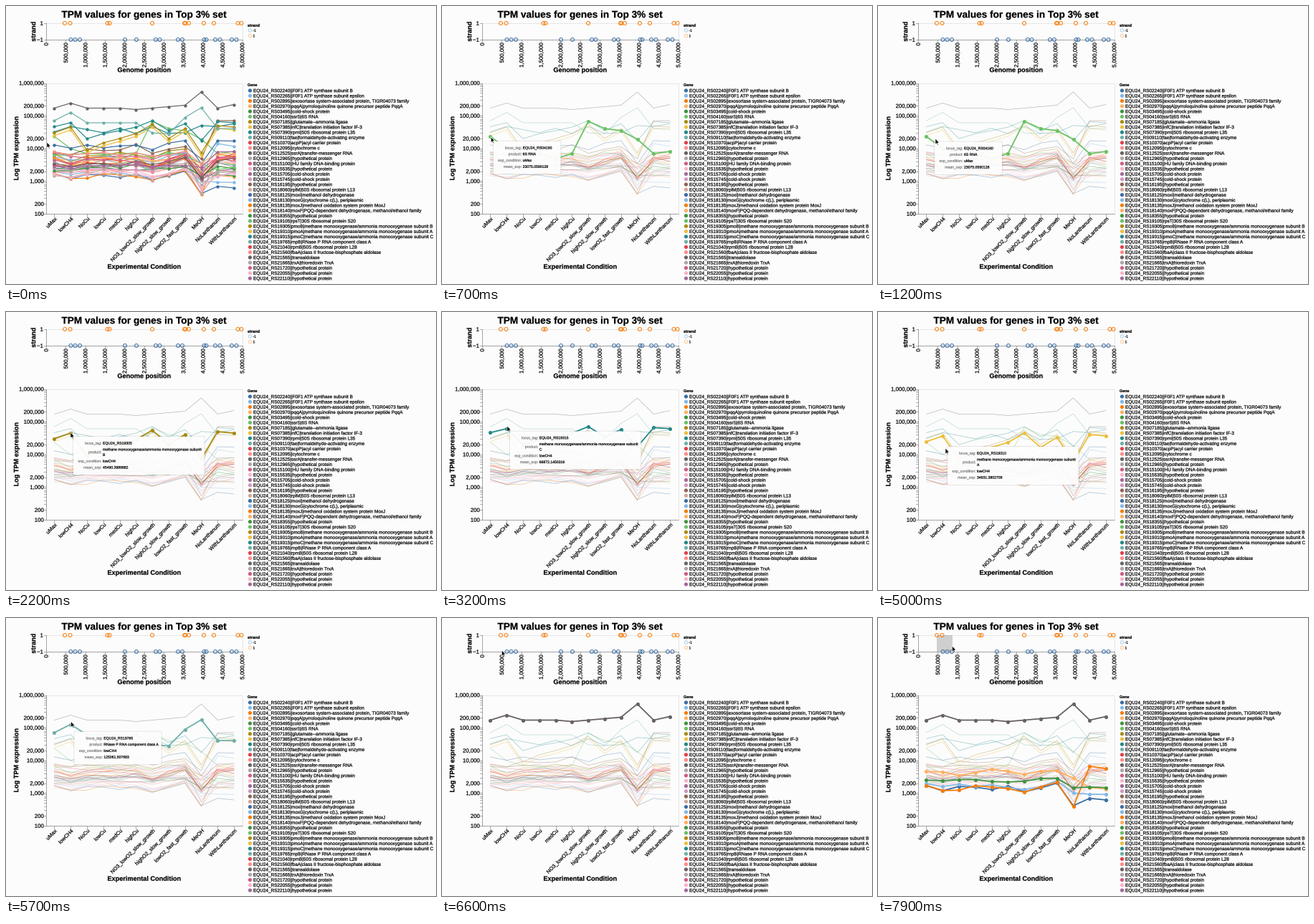
Animation, 600 px wide and 388 px high, one loop 8 s. Source, as a matplotlib script:

```python
import matplotlib.pyplot as plt
import numpy as np
from matplotlib.animation import FuncAnimation
from matplotlib.patches import Circle, FancyBboxPatch, PathPatch, Polygon, Rectangle
from matplotlib.textpath import TextPath
from matplotlib.transforms import Affine2D

W, H, DPI = 600, 388, 100
FRAMES, STEP = 80, 100
PX = 72 / DPI
X0, X1 = 56, 329.5
TOP, BOTTOM = 107.5, 290
BG, AXIS = "#fcfcfc", "#888888"

fig = plt.figure(figsize=(W / DPI, H / DPI), dpi=DPI, facecolor=BG)
ax = fig.add_axes([0, 0, 1, 1])
ax.set(xlim=(0, W), ylim=(H, 0))
ax.axis("off")

PALETTE = ["#3a6ea5", "#83b9e6", "#f77c08", "#ffb061", "#3f9440",
           "#6cc264", "#ab8a0f", "#edbf3c", "#238a87", "#6fb0aa",
           "#e0424a", "#ff8b88", "#686362", "#b0a6a2", "#cf5b88",
           "#fab2c9", "#a5689a", "#cf97c0", "#8e654f", "#d0a896"]

MMO = "methane monooxygenase/ammonia monooxygenase subunit"
GENES = f"""02240||F0F1 ATP synthase subunit B
02265||F0F1 ATP synthase subunit epsilon
02895||exosortase system-associated protein, TIGR04073 family
02970|pqqA|pyrroloquinoline quinone precursor peptide PqqA
03495||cold-shock protein
04160|ssrS|6S RNA
07185||glutamate--ammonia ligase
07385|infC|translation initiation factor IF-3
07390|rpmI|50S ribosomal protein L35
09110|fae|formaldehyde-activating enzyme
10370|acpP|acyl carrier protein
12095||cytochrome c
12525|ssrA|transfer-messenger RNA
12965||hypothetical protein
15100||HU family DNA-binding protein
15535||hypothetical protein
15705||cold-shock protein
15745||cold-shock protein
16195||hypothetical protein
18060|rplM|50S ribosomal protein L13
18125|moxI|methanol dehydrogenase
18130|moxG|cytochrome c(L), periplasmic
18135|moxJ|methanol oxidation system protein MoxJ
18140|moxF|PQQ-dependent dehydrogenase, methanol/ethanol family
18355||hypothetical protein
19105|rpsT|30S ribosomal protein S20
19305|pmoB|{MMO} B
19310|pmoA|{MMO} A
19315|pmoC|{MMO} C
19765|rnpB|RNase P RNA component class A
21040|rpmB|50S ribosomal protein L28
21560|fbaA|class II fructose-bisphosphate aldolase
21565||transaldolase
21665|trxA|thioredoxin TrxA
21720||hypothetical protein
22055||hypothetical protein
22110||hypothetical protein""".split("\n")
PRODUCT = {g[:5]: g.split("|")[2] for g in GENES}

CONDITIONS = ["uMax", "lowCH4", "NoCu", "lowCu", "medCu", "highCu",
              "NO3_lowO2_slow_growth", "highO2_slow_growth",
              "lowO2_fast_growth", "MeOH", "NoLanthanum", "WithLanthanum"]
COND_X = X0 + (X1 - X0) / 12 * (np.arange(12) + 0.5)

FORWARD = (82, 89.5, 141.5, 144.5, 204, 249, 250.5, 255, 276, 290, 323.5, 328.5)
REVERSE = (90.5, 96.5, 103, 166, 182, 209, 214.5, 240, 246, 276.5, 279.5,
           292, 298.5, 315, 321.5)
LOCUS = dict(zip(PRODUCT, sorted(FORWARD + REVERSE)))


def bumps(**steps):
    """Offsets by condition, given as c<index>=pixels."""
    y = np.zeros(12)
    for key, dy in steps.items():
        y[int(key[1:])] = dy
    return y


def make_series():
    rng = np.random.default_rng(7)
    trend = bumps(c1=4, c2=1, c6=5, c8=-4, c9=16)
    lanthanum = bumps(c10=1, c11=1)
    # base height, strength of the trend, lanthanum shift
    traits = {"02240": (236, 1.6, 18), "02265": (236, 0.6, 10),
              "02895": (236, 1.7, -26), "02970": (214, 0.6, 21),
              "03495": (226, 1.0, 11), "07390": (176, -0.7, -8),
              "16195": (200, 1.0, -40), "18125": (194, 1.5, -5)}
    out = {}
    for gene in PRODUCT:
        drawn = rng.uniform(206, 242), rng.uniform(0, 2), rng.normal(-2, 9)
        base, swing, shift = traits.get(gene, drawn)
        y = base + swing * trend + shift * lanthanum + rng.normal(0, 2.5, 12)
        out[gene] = np.clip(y, 160, 266)
    copper = bumps(c0=-8, c1=-16, c2=16, c3=6, c5=-7, c6=-20, c8=-14, c9=20, c10=-18, c11=-16)
    out["19305"] = 185 + copper
    out["19310"] = 189 + copper
    out["19315"] = 174 + 0.7 * copper
    out["04160"] = 206 + bumps(c0=-24, c1=-7, c4=7, c6=-45, c7=-35, c8=-32, c9=-20, c11=-3)
    out["12525"] = 142.5 + bumps(c1=-7, c5=2, c7=-2, c8=-4, c9=-22.5, c11=-5)
    out["19765"] = 163 + bumps(c0=-3, c1=-14.5, c6=14, c7=15.5, c8=-7.5, c9=-21, c10=8, c11=8)
    return out


def text(x, y, s, size, ha="left", weight="normal", angle=0, color="black",
         move=None, **kw):
    """Text as outlines, centred on y, with a hairline for a fuller stroke."""
    path = TextPath((0, 0), s, size=size, prop={"family": "Liberation Sans", "weight": weight})
    dx = {"left": 0, "center": 0.5, "right": 1}[ha] * path.get_extents().x1
    place = Affine2D().translate(-dx, -0.35 * size).scale(1, -1)
    place.rotate_deg(-angle).translate(x, y)
    to_screen = ax.transData if move is None else move + ax.transData
    return ax.add_patch(PathPatch(path, fc=color, ec=color, lw=0.22 * PX,
                                  transform=place + to_screen, **kw))


def line(xs, ys, color=AXIS, width=0.7, **kw):
    return ax.plot(xs, ys, color=color, lw=width * PX, **kw)[0]


def ring(x, y, r, color, width):
    ax.add_patch(Circle((x, y), r, fill=False, ec=color, lw=width * PX, alpha=0.9, zorder=3))


def view(y0, y1):
    ax.add_patch(Rectangle((X0, y0), X1 - X0, y1 - y0, fill=False, ec="#dddddd", lw=0.7 * PX))
    line([X0, X0], [y0, y1])
    line([X0, X1], [y1, y1])


def genome_chart():
    text(192.5, 11.5, "TPM values for genes in Top 3% set", 13.6, "center", "bold")
    view(24, 47)
    for y, s in ((24, "1"), (47, "−1")):
        line([52.5, X0], [y, y])
        text(51.5, y, s, 7.8, "right")
    for i in range(11):
        x = X0 + (X1 - X0) * i / 10
        line([x, x], [47, 50])
        text(x, 51.5, f"{i * 500000:,}", 7.8, "right", angle=90)
    text(38, 36, "strand", 9.15, "center", "bold", 90)
    text(192.5, 89, "Genome position", 9.15, "center", "bold")
    for x in FORWARD:
        ring(x, 24, 2.5, PALETTE[2], 1.1)
    for x in REVERSE:
        ring(x, 47, 2.5, PALETTE[0], 1.1)
    text(337, 27, "strand", 5.6, weight="bold")
    for y, s, c in ((34, "-1", PALETTE[1]), (41.5, "1", PALETTE[3])):
        ring(340.5, y, 2.2, c, 0.7)
        text(344.5, y, s, 5)


def expression_frame():
    view(TOP, BOTTOM)
    for e in range(2, 7):
        for m in range(1, 10 if e < 6 else 2):
            y = TOP + (6 - e - np.log10(m)) * (BOTTOM - TOP) / 4
            line([52.5, X0], [y, y])
            if m < 3:
                text(52.5, y, f"{m * 10 ** e:,}", 7.8, "right")
    for x, s in zip(COND_X, CONDITIONS):
        line([x, x], [BOTTOM, BOTTOM + 3.5])
        text(x + 2, 296, s, 7.3, "right", angle=45)
    text(14, 199, "Log TPM expression", 9.15, "center", "bold", 90)
    text(192.5, 363.5, "Experimental Condition", 9.15, "center", "bold")


def gene_legend():
    text(337, 110, "Gene", 5.4, weight="bold")
    for i, g in enumerate(GENES):
        y = 118 + i * 7.28
        ax.add_patch(Circle((340.5, y), 2.6, fc=PALETTE[i % 20], ec="none"))
        text(345, y, "EQU24_RS" + g, 6.41)


def tooltip(gene, cond, value):
    """Build a tooltip at the origin; `drift` carries it to the pointer."""
    wide = PRODUCT[gene].startswith(MMO)
    extra = 7.5 if wide else 0
    product = [MMO, PRODUCT[gene][-1]] if wide else [PRODUCT[gene]]
    rows = [("locus_tag:", 9, ["EQU24_RS" + gene]),
            ("product:", 17.7 + extra / 2, product),
            ("exp_condition:", 26.5 + extra, [CONDITIONS[cond]]),
            ("mean_exp:", 35.3 + extra, [value])]
    parts, right = [], 90
    for key, y, lines in rows:
        parts.append(text(39, y, key, 5.1, "right", color="#808080", move=drift, zorder=21))
        for k, s in enumerate(lines):
            dy = (k - (len(lines) - 1) / 2) * extra
            label = text(41, y + dy, s, 5.1, move=drift, zorder=21)
            right = max(right, 41 + label.get_path().get_extents().x1)
            parts.append(label)
    for grow, color, alpha in ((1.2, "black", 0.04), (0.5, "black", 0.08), (0, "white", 0.95)):
        box = FancyBboxPatch((-grow, -grow), right + 4 + 2 * grow, 45.5 + extra + 2 * grow,
                             boxstyle="round,pad=0,rounding_size=1.5", fc=color, ec="none",
                             alpha=alpha, zorder=20, transform=drift + ax.transData)
        parts.append(ax.add_patch(box))
    return parts


genome_chart()
expression_frame()
gene_legend()

series = make_series()
curves = {g: line(COND_X, y, PALETTE[i % 20], marker="o", mew=0)
          for i, (g, y) in enumerate(series.items())}

# points that react to the pointer
HOVERS = [("04160", 0, "23075.0590128"), ("19305", 1, "45490.3989882"),
          ("19310", 1, "34631.3802709"), ("19315", 1, "66872.1450316"),
          ("19765", 1, "125061.507683"), ("12525", 1, "243168.482917")]
drift = Affine2D()
tips = {h[0]: tooltip(*h) for h in HOVERS}

# time in ms, x, y of the pointer tip
PATH = np.array([(0, 57, 190), (500, 67, 183), (1000, 70, 182), (1200, 80, 185),
                 (2000, 90, 168), (2600, 90, 168), (4000, 92, 147), (4400, 93, 148),
                 (4800, 92, 174), (5000, 94, 190), (5200, 94, 186), (5800, 90, 136),
                 (6600, 83.5, 45), (7000, 82, 41), (7900, 103.5, 39)])
WAKE, LAG = 200, 100

BRUSH_START, BRUSH_X = 7000, 81.5
brush = ax.add_patch(Rectangle((BRUSH_X, 24), 0, 23, fc="#333333", ec="none", alpha=0.22))

ARROW = np.array([(0, 0), (0, 8), (1.8, 6.5), (3, 9.2), (4.2, 8.7), (3, 6), (5.4, 5.8)])
arrow = ax.add_patch(Polygon(ARROW, fc="black", ec="white", lw=0.6 * PX, zorder=30))


def pointer(t):
    return np.array([np.interp(t, PATH[:, 0], PATH[:, k]) for k in (1, 2)])


def nearest(pos):
    return min(HOVERS, key=lambda h: np.hypot(COND_X[h[1]] - pos[0],
                                              series[h[0]][h[1]] - pos[1]))[0]


def style(curve, mode):
    width, dot, alpha, z = {"all": (1.2, 4.4, 1, 4), "dim": (0.7, 0, 0.45, 4),
                            "bold": (1.8, 5.2, 1, 6)}[mode]
    curve.set(linewidth=width * PX, markersize=dot * PX, alpha=alpha, zorder=z)


def update(i):
    t = i * STEP
    now, seen = pointer(t), pointer(t - LAG)
    arrow.set_xy(ARROW + now)
    drift.clear().translate(seen[0] + 4, seen[1] + 6)

    awake = t >= WAKE
    hover = nearest(seen)
    reach = now[0] if t >= BRUSH_START else BRUSH_X
    brush.set_width(reach - BRUSH_X)
    bold = {hover} | {g for g, x in LOCUS.items() if BRUSH_X < x <= reach}
    for g, curve in curves.items():
        style(curve, "all" if not awake else "bold" if g in bold else "dim")
    for g, parts in tips.items():
        for p in parts:
            p.set_visible(bool(awake and g == hover and seen[1] > TOP))
    return []


anim = FuncAnimation(fig, update, frames=FRAMES, interval=STEP, repeat=True,
                     repeat_delay=0, blit=False)
plt.show()
```
